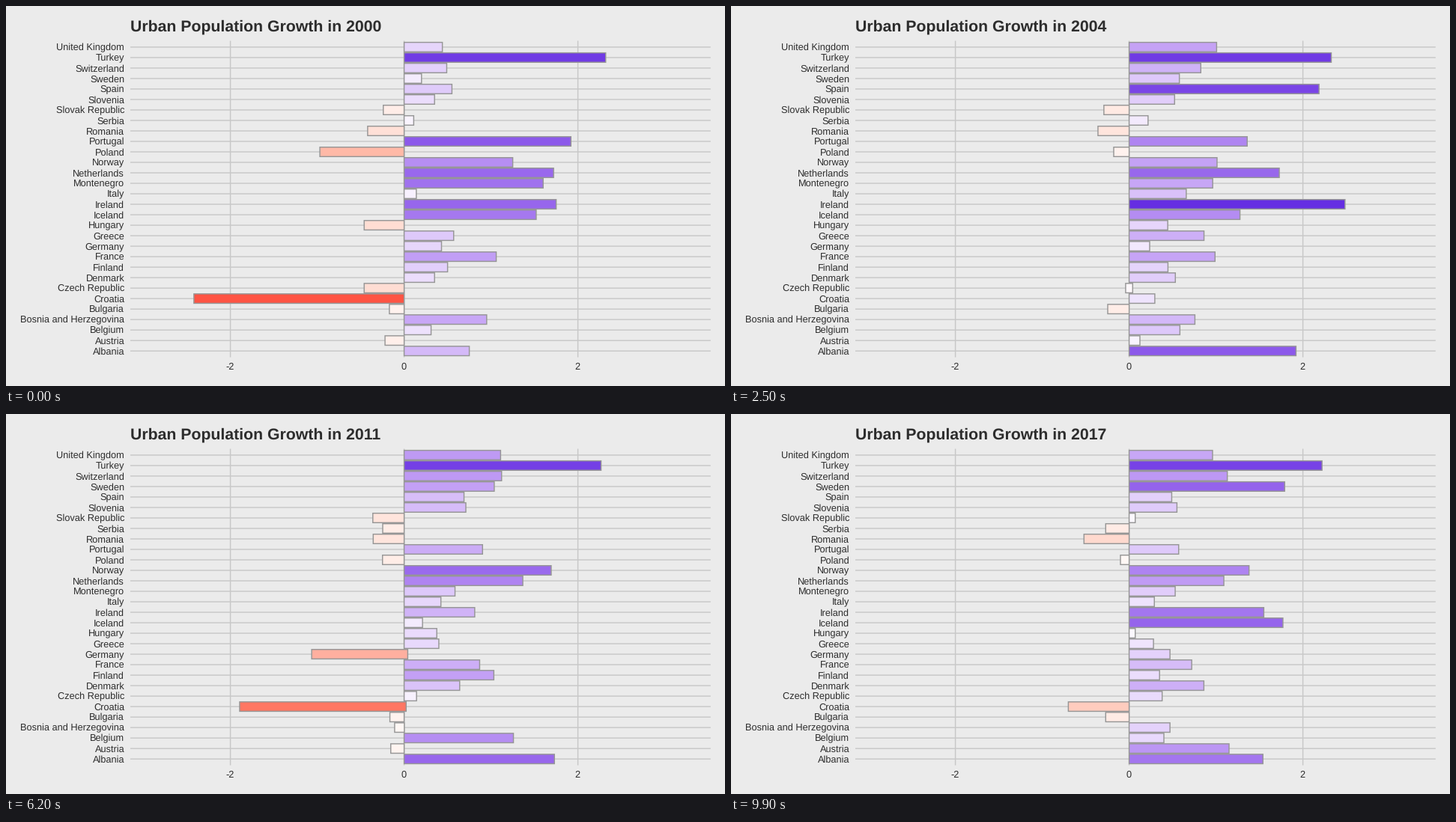
A matplotlib script for the animation above (10000 ms loop, 960 by 508 pixels).

```python
import numpy as np
import matplotlib.pyplot as plt
from matplotlib.animation import FuncAnimation
from matplotlib.patches import Rectangle

plt.rcParams["font.family"] = "Liberation Sans"
plt.rcParams["text.hinting"] = "none"

W, H, DPI = 960, 508, 100
FRAMES, INTERVAL = 100, 100
PX = 72 / DPI

BG, GRID, EDGE, INK = "#ebebeb", "#c8c8c8", "#969696", "#2d2d2d"
LEFT, RIGHT, TOP, BOTTOM = 166, 940.8, 46.5, 469.6
ZERO, UNIT = 531.6, 116.0
BASE, PITCH, BAR = 461.2, 14.01, 12.6
LIMIT = 3.225

SPAN = 17
YEARS = np.arange(SPAN + 1)
KEYS = np.round(YEARS * (FRAMES - 1) / SPAN)
TIMES = np.arange(FRAMES)

countries = {}


def trend(name, *bends, shocks=None):
    """Yearly growth: straight runs between evenly spaced bends,
    plus shocks that last a single year."""
    values = np.interp(YEARS, np.linspace(0, SPAN, len(bends)), bends)
    for year, size in (shocks or {}).items():
        values[year] += size
    countries[name] = values


trend("Albania", 2.25, 2.08, 1.5, 1.72, 1.81, 1.54, shocks={0: -1.5})
trend("Austria", -.22, .22, -.13, -.42, 1.24, 1.15)
trend("Belgium", .31, .51, .78, 1.45, .31, .4)
trend("Bosnia and Herzegovina", .95, .82, .59, -.03, -.6, .47)
trend("Bulgaria", -.17, -.27, -.15, -.27, shocks={1: -1.2, 2: -1.45})
trend("Croatia", .31, .32, .23, .06, .06, -.7, shocks={0: -2.73, 11: -2.9})
trend("Czech Republic", -.46, -.17, .45, .13, .17, .38)
trend("Denmark", .35, .53, .68, .6, .86)
trend("Finland", .5, .4, .57, 1.08, .84, .35)
trend("France", 1.06, .92, .72)
trend("Germany", .43, .05, .47, shocks={11: -1.77})
trend("Greece", .57, .9, .76, .56, -.49, .28)
trend("Hungary", .3, .37, .64, .46, -.1, .07, shocks={0: -.76})
trend("Iceland", 1.52, .68, 2.85, -.03, 1.15, 1.77)
trend("Ireland", 1.75, 2.15, 3.37, .75, .82, 1.55)
trend("Italy", .14, .66, .65, .18, 1.67, .29)
trend("Montenegro", 1.6, .96, .56, .61, .53, shocks={2: 1})
trend("Netherlands", 1.72, 1.89, 1.3, 1.46, .88, 1.09, shocks={2: .49})
trend("Norway", 1.25, .88, 1.36, 1.68, 1.8, 1.38)
trend("Poland", -.05, -.3, -.1, shocks={0: -.92})
trend("Portugal", 1.92, 1.4, 1.25, 1.02, .24, .57)
trend("Romania", -.42, -.3, -.52,
      shocks={1: -.9, 2: -1.57, 7: -.9, 8: -1.11, 9: -.3})
trend("Serbia", .11, .3, 0, -.25, -.26, -.27)
trend("Slovak Republic", -.24, -.31, -.24, -.43, -.01, .07)
trend("Slovenia", .35, .35, .98, .74, .52, .55)
trend("Spain", .55, 2.18, 2.2, .83, -.24, .49)
trend("Sweden", .2, .46, .89, 1, 1.25, 1.79)
trend("Switzerland", .49, .8, .89, 1.12, 1.16, 1.13)
trend("Turkey", 2.32, 2.42, 2.08, 2.24, 2.43, 2.22)
trend("United Kingdom", .44, .96, 1.13, 1.14, .95, .96)

TO_XYZ = np.array([[.4124, .3576, .1805],
                   [.2126, .7152, .0722],
                   [.0193, .1192, .9505]])
WHITE = TO_XYZ.sum(axis=1)


def lab(r, g, b):
    c = np.array([r, g, b]) / 255
    lin = np.where(c > .04045, ((c + .055) / 1.055) ** 2.4, c / 12.92)
    q = TO_XYZ @ lin / WHITE
    x, y, z = np.where(q > .008856, np.cbrt(q), 7.787 * q + 16 / 116)
    return np.array([116 * y - 16, 500 * (x - y), 200 * (y - z)])


def rgb(colours):
    """Lab rows to display colours: slight channel leak, 1.8 gamma."""
    L, a, b = colours.T
    y = (L + 16) / 116
    f = np.array([y + a / 500, y, y - b / 200])
    q = np.where(f > .2069, f ** 3, (f - 16 / 116) / 7.787)
    red, green, blue = np.linalg.inv(TO_XYZ) @ (q * WHITE[:, None])
    green = green - .03 * np.maximum(blue - green, 0)
    blue = blue + .03 * np.maximum(red - blue, 0)
    return np.clip([red, green, blue], 0, 1).T ** (1 / 1.8)


MID, LOW, HIGH = lab(255, 255, 255), lab(255, 0, 0), lab(42, 0, 222)


def tween(values):
    return np.interp(TIMES, KEYS, values)


def fills(values):
    s = np.clip(values / LIMIT, -1, 1)[:, None]
    keyed = MID + abs(s) * (np.where(s < 0, LOW, HIGH) - MID)
    return rgb(np.column_stack([tween(channel) for channel in keyed.T]))


fig = plt.figure(figsize=(W / DPI, H / DPI), dpi=DPI, facecolor=BG)
ax = fig.add_axes([0, 0, 1, 1])
ax.set(xlim=(0, W), ylim=(H, 0))
ax.axis("off")


def rule(xs, ys):
    ax.plot(xs, ys, color=GRID, lw=1.45 * PX, solid_capstyle="butt",
            snap=False, zorder=1)


def label(x, y, text, size=12.8, **kw):
    return ax.text(x, y, text, size=size * PX, color=INK, va="baseline", **kw)


rows = []
for i, (name, values) in enumerate(countries.items()):
    y = BASE - PITCH * i
    rule([LEFT, RIGHT], [y, y])
    label(158.2, y + 4.6, name, ha="right")
    bar = Rectangle((ZERO, y - BAR / 2), 0, BAR, ec=EDGE, lw=1.45 * PX,
                    joinstyle="miter", snap=False, zorder=2)
    ax.add_patch(bar)
    lo = ZERO + UNIT * tween(np.minimum(values, 0))
    hi = ZERO + UNIT * tween(np.maximum(values, 0))
    rows.append((bar, lo, hi, fills(values)))

for tick in (-2, 0, 2):
    x = ZERO + UNIT * tick
    rule([x, x], [TOP, BOTTOM])
    label(x - .3, 486.2, str(tick), ha="center")

title = label(LEFT - .3, 33.7, "", 21.3, weight="bold")


def draw(i):
    year = 2000 + round(i * SPAN / (FRAMES - 1))
    title.set_text(f"Urban Population Growth in {year}")
    for bar, lo, hi, fill in rows:
        bar.set_x(lo[i])
        bar.set_width(hi[i] - lo[i])
        bar.set_facecolor(fill[i])
    return [title] + [row[0] for row in rows]


anim = FuncAnimation(fig, draw, frames=FRAMES, interval=INTERVAL,
                     repeat=True, repeat_delay=0, blit=False)
plt.show()
```
